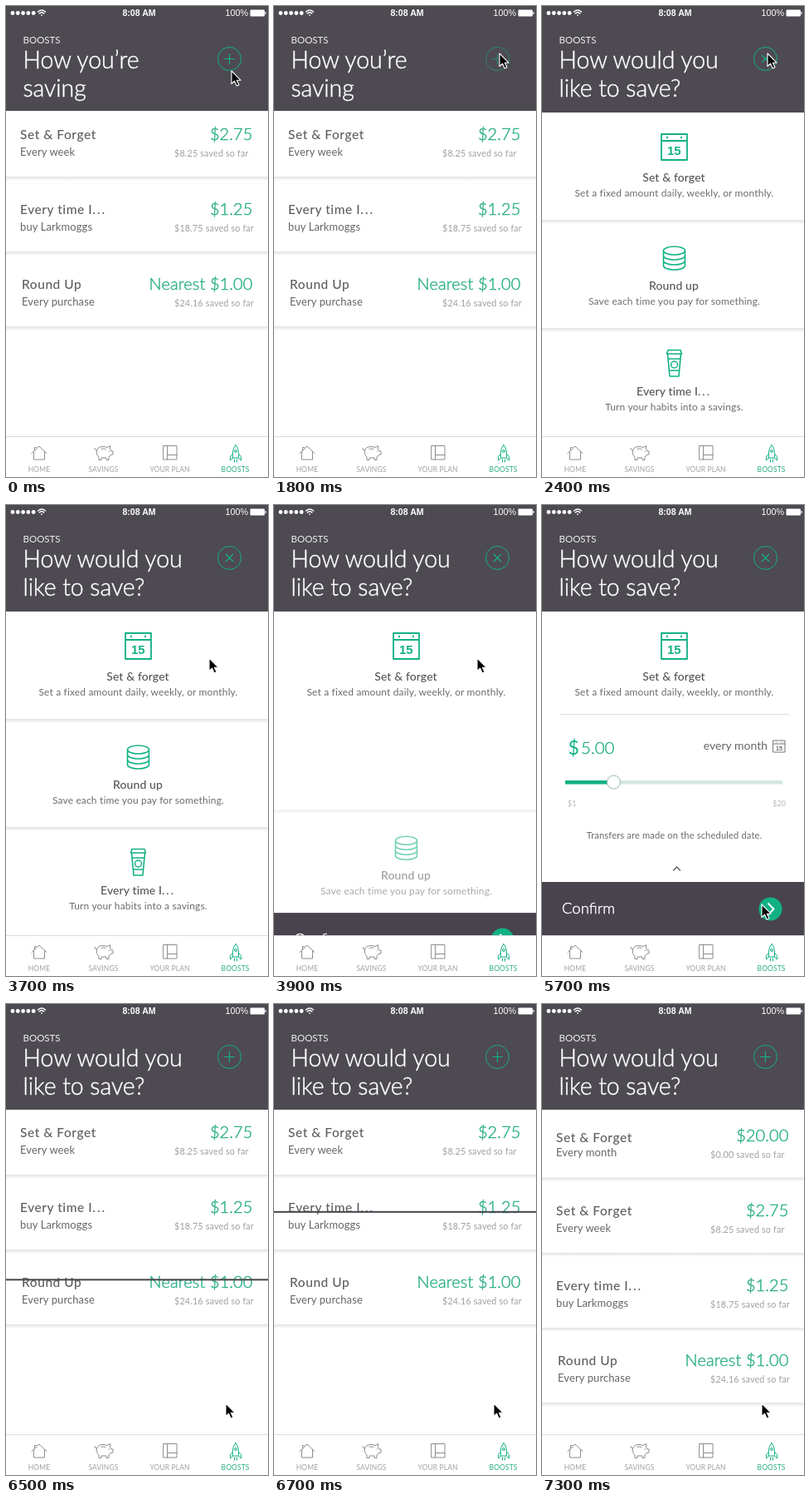
An HTML page that plays this animation: 316 by 566 pixels, repeating every 7400 ms.

```html
<!DOCTYPE html>
<html lang="en">
<head>
<meta charset="utf-8">
<title>Boosts</title>
<style>
  html, body { margin: 0; width: 100%; height: 100%; overflow: hidden; background: #fff; }
  svg { display: block; width: 316px; height: 566px; }
  text { font-family: Lato, "Open Sans", sans-serif; white-space: pre; stroke-width: 0; }
  .light { font-weight: 300; stroke-width: .45px; }
  .sys { font-family: "Liberation Sans", Arial, sans-serif; }
  .line { fill: none; stroke-linecap: round; stroke-linejoin: round; }
</style>
</head>
<body>
<svg id="stage" viewBox="0 0 316 566"></svg>
<script>
const LOOP = 7400, GREEN = '#12b184', MONEY = '#2aae86', DARK = '#4e4a52', GREY = '#8c8c8c';
const stage = document.getElementById('stage');

const text = (x, y, size, str, fill, more = '') =>
  `<text x="${x}" y="${y}" font-size="${size}" fill="${fill}" stroke="${fill}" ${more}>${str.replace(/&/g, '&amp;')}</text>`;
const line = (d, color, width = 1, more = '') =>
  `<path class="line" d="${d}" stroke="${color}" stroke-width="${width}" ${more}/>`;
const rect = (x, y, w, h, fill, more = '') =>
  `<rect x="${x}" y="${y}" width="${w}" height="${h}" fill="${fill}" ${more}/>`;
const group = (id, body, more = '') => `<g id="${id}" ${more}>${body}</g>`;
const edge = y => rect(0, y, 316, 5, 'url(#shade)');

const LIGHT = 'class="light"', MID = 'text-anchor="middle"', END = 'text-anchor="end"';
const DOTS = '<tspan letter-spacing="2">...</tspan>';

function row(y, x, title, sub, amount, saved, subY = y + 20, savedY = y + 21, amountY = y + 1) {
  return text(x, y, 15.5, title, '#5e5e5e', 'font-weight="500" letter-spacing=".55"') +
    text(x, subY, 13, sub, '#666', 'letter-spacing=".1"') +
    text(297.5, amountY, 20, amount, MONEY, `${LIGHT} ${END} letter-spacing=".1"`) +
    text(203, savedY, 10.8, saved + ' saved so far', '#a0a0a0', 'letter-spacing=".15"');
}

function option(y, title, note) {
  return text(159, y, 14, title, '#555', `${MID} font-weight="500" letter-spacing=".1"`) +
    text(159.5, y + 18, 12, note, '#6c6c6c', `${MID} letter-spacing=".15"`);
}

const headline = (id, a, b) => group(id,
  [a, b].map((s, i) => text(20.5, 75 + 34 * i, 28.5, s, '#fff', `${LIGHT} letter-spacing="-.05"`)).join(''));

const calendar =
  line('M144 154H175V185H144ZM144 162H175M151 157.5V158.5M168 157.5V158.5', GREEN, 1.8) +
  text(159.3, 178.5, 15, '15', GREEN, `${MID} class="sys" font-weight="700"`);

const coins = line('M146.500 294' + 'a13 5 0 0 1 26 0a13 5 0 0 1-26 0V312a13 5 0 0 0 26 0V294' +
  [300, 306].map(y => `M146.500 ${y}a13 5 0 0 0 26 0`).join(''), GREEN, 1.6);

const cup = line('M152 413.500H167L168.500 418H150.500ZM151.500 418L154 445H165L167.500 418M152 424H167M153.500 438H165.500', GREEN, 1.6) +
  `<circle cx="159.500" cy="431" r="4" fill="none" stroke="${GREEN}" stroke-width="1.500"/>`;

// house, pig, book, rocket
const icons = [
  'M31 537.500L40 529L49 537.500M33.500 535.500V545H46.500V535.500M34.500 534V530.500H36.500',
  'M107 531.500Q107 534 109.500 534Q111 529.500 117 529.500Q120 529.500 122 530.500L125.500 528.500V532.500L127 535H129V539H127L124 542V545.500H121V543H115V545.500H112V542Q108.500 539 109.500 534M115 532.300Q117.500 531.500 120 532.300M124.500 535V535.300',
  'M190 528.500H206V545H190ZM194.500 528.500V545M194.500 539.500H206',
  'M277 527.500Q281.500 532 280.500 543H273.500Q272.500 532 277 527.500ZM273.200 538.500L270.500 541.500V546L273.500 543.500M280.800 538.500L283.500 541.500V546L280.500 543.500M275.500 545V548M278.500 545V548M275.500 535a1.500 1.500 0 1 0 3 0a1.500 1.500 0 1 0-3 0'
];
const tabs = ['HOME', 'SAVINGS', 'YOUR PLAN', 'BOOSTS'].map((name, i) => {
  const color = i == 3 ? GREEN : GREY;
  return line(icons[i], color, 1) +
    text([40, 117.5, 197.5, 276.5][i], 560, 8.5, name, i == 3 ? MONEY : '#a2a2a2', `${MID} letter-spacing=".1"`);
}).join('');

const status = [8, 14.3, 20.6, 26.9, 33.2].map(x => `<circle cx="${x}" cy="8.500" r="2.400" fill="#fff"/>`).join('') +
  line('M38.500 7Q43 3 47.500 7M40.200 9Q43 6.500 45.800 9M42.700 11H43.300', '#fff', 1.4) +
  text(160.5, 12, 10.6, '8:08 AM', '#fff', `${MID} class="sys" font-weight="700"`) +
  text(264.5, 12, 10.8, '100%', '#fff', 'class="sys"') +
  rect(294.5, 4.5, 17.5, 8, '#fff', 'rx="1"') + rect(312.5, 7, 1.2, 3, '#fff');

stage.innerHTML = `
  <defs><linearGradient id="shade" x2="0" y2="1">
    <stop stop-color="#e2e2e2"/><stop offset="1" stop-color="#fff"/>
  </linearGradient></defs>` +
  group('list',
    group('added', row(165.5, 17, 'Set & Forget', 'Every month', '$20.00', '$0.00', 183, 184.5, 164.5) + edge(208.5)) +
    group('rows',
      row(160, 17, 'Set & Forget', 'Every week', '$2.75', '$8.25') + edge(205) +
      row(250, 17, 'Every time I' + DOTS, 'buy Larkmoggs', '$1.25', '$18.75') + edge(295) +
      row(340, 19, 'Round Up', 'Every purchase', 'Nearest $1.00', '$24.16') + edge(385))) +
  group('options',
    rect(0, 126, 316, 392, '#fff') +
    calendar + option(211, 'Set & forget', 'Set a fixed amount daily, weekly, or monthly.') +
    group('others',
      edge(257) + coins + option(341, 'Round up', 'Save each time you pay for something.') +
      edge(387) + cup + option(468, 'Every time I' + DOTS, 'Turn your habits into a savings.')) +
    group('detail',
      rect(22, 251, 276, 1, '#ddd') +
      text(31.5, 300, 23, '$', GREEN) + text(47, 299, 20.5, '5.00', MONEY, LIGHT) +
      text(272, 294, 14, 'every month', '#666', END) +
      line('M279 283H293V297H279ZM279 287H293M282.500 285V285.200M289.500 285V285.200', '#777') +
      text(286, 295, 7, '15', '#666', `${MID} class="sys" font-weight="700"`) +
      rect(28, 331, 262, 4.5, '#d5e7e1') + rect(28, 331, 58, 4.5, GREEN) +
      `<circle cx="86.500" cy="333" r="8" fill="#fff" stroke="#94b8ac"/>` +
      text(31, 362, 9, '$1', '#b5b5b5') + text(294, 362, 9, '$20', '#b5b5b5', END) +
      text(159.5, 401, 11.2, 'Transfers are made on the scheduled date.', '#6c6c6c', `${MID} letter-spacing=".12"`) +
      line('M158.500 439L162.500 435L166.500 439', '#555', 1.3))) +
  rect(0, 453, 316, 64, '#48434d', 'id="bar"') +
  group('confirm',
    text(24, 491, 18.5, 'Confirm', '#fff', LIGHT) +
    `<circle cx="275.500" cy="485.500" r="14" fill="${GREEN}"/>` +
    line('M273 479L279.500 485.500L273 492', '#fff', 1.8)) +
  rect(0, 0, 316, 126, DARK, 'id="header"') + status +
  text(20.5, 45, 11.5, 'BOOSTS', '#eee') +
  headline('before', 'How you’re', 'saving') +
  headline('after', 'How would you', 'like to save?') +
  group('button',
    `<circle r="14" fill="none" stroke="${GREEN}"/>` +
    group('cross', line('M-6 0H6M0-6V6', GREEN, 1.2))) +
  rect(0, 517, 316, 49, '#fff') + rect(0, 517, 316, 1, '#dcdcdc') + tabs +
  group('cursor', `<path d="M0 0V15.500L3.600 12.200L6.200 18L9 16.800L6.400 11.200H11Z"
    fill="#000" stroke="#fff" stroke-width="1.100" stroke-linejoin="round"/>`);

const part = {};
stage.querySelectorAll('[id]').forEach(el => part[el.id] = el);

const clamp = v => Math.max(0, Math.min(1, v));
const ramp = (t, a, b) => clamp((t - a) / (b - a));
const ease = (t, a, b) => { const p = ramp(t, a, b); return p * p * (3 - 2 * p); };
const fade = (id, v) => part[id].setAttribute('opacity', v);
const move = (id, x, y) => part[id].setAttribute('transform', `translate(${x} ${y})`);

function draw(t) {
  const open = ease(t, 1800, 2400), pick = ease(t, 3700, 4150);
  const close = ease(t, 5800, 6200), insert = ease(t, 6850, 7250);

  // list, with the new row pushing the rest down
  fade('list', 1 - ease(t, 1800, 2100) + close);
  fade('added', ease(t, 7000, 7250));
  move('rows', 0, 94 * insert);

  // options and the expanded form
  move('options', 0, 392 * (1 - open));
  fade('options', (t >= 1800) * (1 - close));
  move('others', 0, 260 * pick);
  fade('others', 1 - pick);
  fade('detail', ease(t, 3900, 4200));

  // confirm bar rises, then thins to a line and runs up to the header
  const rise = 64 * (1 - pick), run = ramp(t, 6200, 7000);
  part.bar.setAttribute('y', 453 + rise - 326 * run);
  part.bar.setAttribute('height', 64 - 62 * ease(t, 6200, 6500));
  fade('bar', t < 7000 ? 1 : 0);
  move('confirm', 0, rise);
  fade('confirm', 1 - close);

  // header
  const swap = ease(t, 1800, 2100);
  part.header.setAttribute('height', 126 + 2 * swap - close);
  fade('before', 1 - swap);
  fade('after', swap);
  move('button', 269.5, 63.5);
  fade('button', 1 - .4 * ease(t, 1200, 1600) + .4 * swap);
  part.cross.setAttribute('transform', `rotate(${45 * (swap - close)})`);

  const a = ease(t, 100, 700), b = ease(t, 2600, 3300), c = ease(t, 5000, 5700);
  move('cursor', 272 - 27 * b + 20 * c, 78 - 21 * a + 127 * b + 296 * c);
}

function tick(now) {
  draw(now % LOOP);
  requestAnimationFrame(tick);
}
draw(0);
requestAnimationFrame(tick);
</script>
</body>
</html>
```
